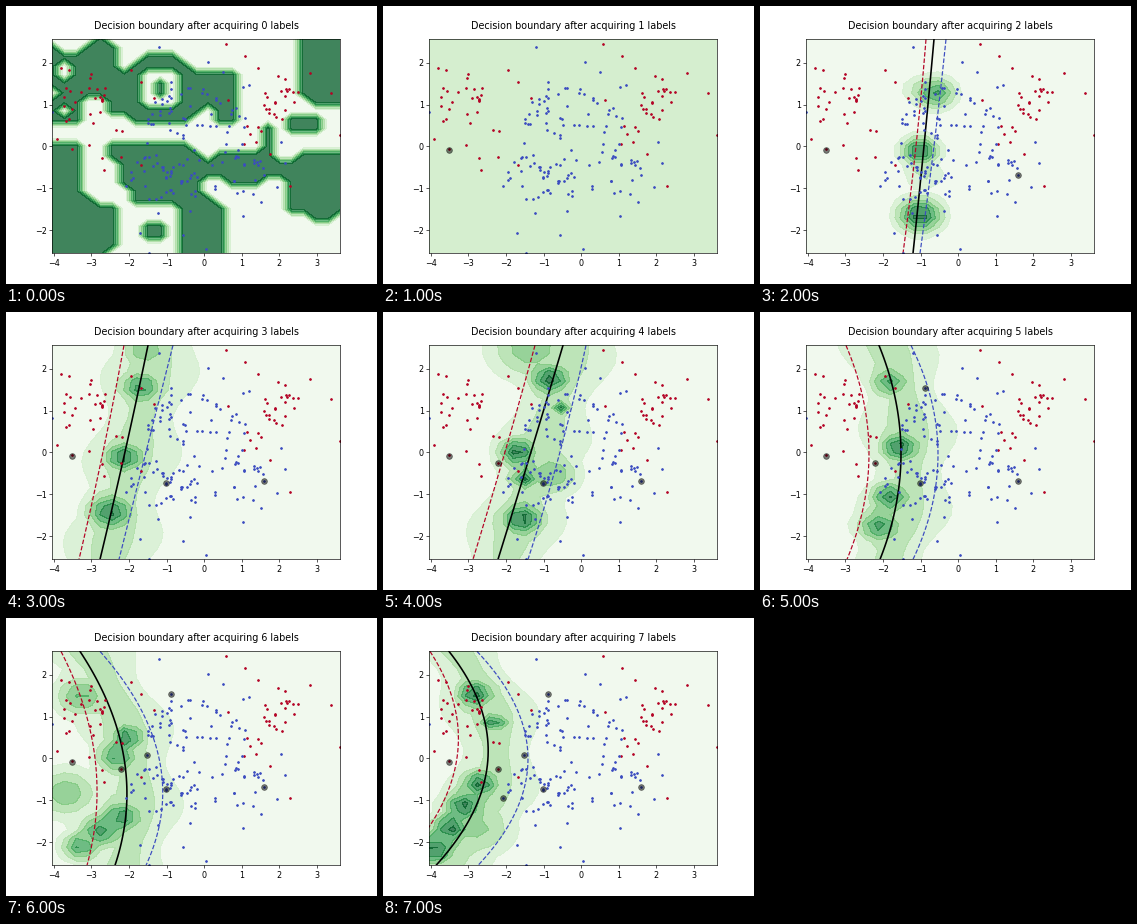
A matplotlib script that plays this animation: 371x278 px, repeating every 8 s.

```python
import numpy as np
import matplotlib.pyplot as plt
from matplotlib.animation import FuncAnimation

W, H, DPI = 371, 278, 58
RED, BLUE = "#b40426", "#3b4cc0"
LEFT, RIGHT, TOP, BOTTOM = 46.4, 333.9, 33.4, 247.4
LEVELS = np.linspace(0, 1.05, 8)

fig, ax = plt.subplots(figsize=(W / DPI, H / DPI), dpi=DPI)
rng = np.random.default_rng(4)


def to_data(x, y):
    """Stage pixels to axes units."""
    return (np.asarray(x) - 198.2) / 37.6, (140.5 - np.asarray(y)) / 41.75


def cloud(n, x, y, sx, sy):
    """Evenly loose cluster inside an ellipse."""
    angle = rng.uniform(0, 2 * np.pi, n)
    radius = np.sqrt(rng.uniform(0, 1, n))
    return np.column_stack([x + sx * radius * np.cos(angle), y + sy * radius * np.sin(angle)])


# Outlying samples are placed, the dense middles are drawn at random.
reds = np.vstack([
    [(55, 62), (63, 64), (85, 68), (125, 64), (135, 76), (148, 92), (110, 124), (116, 125),
     (51, 133), (83, 139), (66, 143), (96, 152), (98, 164), (115, 151), (135, 159),
     (220, 38), (239, 50), (252, 62), (222, 94), (304, 67), (325, 87), (334, 129),
     (238, 138), (264, 148), (284, 180)],
    cloud(22, 78, 97, 26, 27), cloud(22, 273, 91, 20, 24), cloud(5, 249, 118, 10, 22)])
blues = np.vstack([
    [(153, 41), (202, 56), (165, 76), (165, 83), (46, 106), (217, 66), (237, 81), (243, 79),
     (141, 137), (120, 180), (160, 171), (275, 136), (279, 157), (258, 169), (271, 181),
     (255, 196), (237, 210), (200, 243), (177, 229), (143, 247), (134, 227), (152, 207),
     (184, 205)],
    cloud(32, 184, 107, 34, 26), cloud(7, 149, 107, 10, 14), cloud(32, 151, 172, 28, 24),
    cloud(12, 185, 167, 10, 31), cloud(23, 231, 169, 28, 26), cloud(10, 228, 121, 14, 25)])
queries = np.array([(66.5, 144.5), (258, 169), (160, 171), (115, 151),
                    (165, 76), (141, 137), (120, 180)])

gx, gy = np.meshgrid(np.linspace(LEFT, RIGHT, 25), np.linspace(TOP, BOTTOM, 25))

# Untrained model, rounded boxes: centre x, y and half sizes.
solid = [(75, 60, 36, 32), (56, 108, 22, 14), (155, 86, 40, 36), (115, 90, 16, 18),
         (58, 160, 20, 28), (62, 224, 50, 32), (108, 145, 14, 9), (155, 166, 40, 31),
         (150, 222, 16, 10), (322, 58, 36, 40), (297, 118, 17, 9), (216, 92, 22, 26),
         (262, 130, 7, 12), (318, 178, 40, 34), (238, 162, 40, 15), (195, 222, 25, 32)]
holes = [(70, 36, 13, 11), (58, 65, 7, 8), (58, 104, 7, 6), (154, 82, 19, 18),
         (203, 108, 7, 12)]
core = [(154, 82, 6, 7)]

# Uncertainty bumps per label count: x, y, width, height of peak.
bumps = {
    2: [(160, 145, 18, 1), (160, 209, 22, 1.02), (175, 87, 20, .82), (160, 84, 18, .4),
        (164, 168, 20, .36)],
    3: [(118, 145, 20, .98), (105, 200, 24, .95), (135, 75, 22, .85), (140, 38, 26, .6)],
    4: [(167, 67, 20, 1.02), (177, 96, 11, .92), (135, 140, 19, 1.02), (142, 166, 15, .98),
        (168, 162, 28, .62), (139, 207, 22, 1), (148, 36, 42, .56)],
    5: [(140, 135, 20, 1), (130, 185, 20, .92), (120, 214, 22, .85), (130, 70, 20, .8)],
    6: [(121, 119, 17, .95), (112, 138, 22, .82), (115, 199, 22, .88), (95, 213, 22, .86),
        (75, 228, 19, .82), (76, 78, 27, .64), (60, 175, 32, .57)],
    7: [(92, 76, 19, 1), (111, 104, 13, 1), (97, 166, 19, .98), (81, 188, 20, 1),
        (68, 210, 20, 1), (52, 231, 22, .98), (94, 210, 38, .5)],
}

# Boundary x at the top, middle and bottom: red, black, blue.
boundaries = {
    2: [(166, 156, 143), (174, 164, 153), (186, 174, 160)],
    3: [(118, 97, 73), (142, 119, 94), (167, 140, 113)],
    4: [(152, 122, 90), (180, 148, 115), (203, 177, 145)],
    5: [(86, 109, 87), (119, 141, 120), (151, 178, 153)],
    6: [(55, 89, 81), (74, 118, 109), (94, 153, 140)],
    7: [(47, 74, 15), (66, 105, 53), (94, 145, 95)],
}


def curve(xs, y):
    return np.polyval(np.polyfit((TOP, 140, BOTTOM), xs, 2), y)


def inside(boxes):
    mask = np.zeros(gx.shape, bool)
    for x, y, rx, ry in boxes:
        mask |= abs((gx - x) / rx) ** 3 + abs((gy - y) / ry) ** 3 < 1
    return mask


def region_field():
    return (inside(solid) & ~inside(holes) | inside(core)).astype(float)


def bump_field(n):
    z = np.full(gx.shape, .02)
    if n > 2:
        # faint uneven halo along the boundary
        reach = 42 + 9 * np.sin(gy / 13 + n)
        z += .33 * np.exp(-((gx - curve(boundaries[n][1], gy) - 8) / reach) ** 2)
    for x, y, r, peak in bumps[n]:
        z = np.maximum(z, peak * np.exp(-((gx - x) / r) ** 2 - ((gy - y) / (.78 * r)) ** 2))
    return z


def draw_field(n):
    if n == 1:
        ax.set_facecolor("#d5eecf")
        return
    z = bump_field(n) if n else region_field()
    ax.contourf(*to_data(gx, gy), z, levels=LEVELS, cmap="Greens", alpha=.75)


def draw_boundaries(n):
    y = np.linspace(TOP, BOTTOM, 50)
    styles = [(RED, "--", 1.5), ("k", "-", 2), (BLUE, "--", 1.5)]
    for xs, (color, dash, width) in zip(boundaries.get(n, []), styles):
        ax.plot(*to_data(curve(xs, y), y), color=color, ls=dash, lw=width, zorder=1.5)


def draw(n):
    ax.clear()
    ax.set_facecolor("w")
    draw_field(n)
    draw_boundaries(n)
    for points, color in ((reds, RED), (blues, BLUE)):
        ax.scatter(*to_data(*points.T), s=5, color=color, zorder=2)
    ax.scatter(*to_data(*queries[:n].T), s=50, color="k", alpha=.5, zorder=2.1)
    xlim, ylim = to_data((LEFT, RIGHT), (BOTTOM, TOP))
    ax.set(xlim=xlim, ylim=ylim, xticks=range(-4, 4), yticks=range(-2, 3))
    ax.set_title(f"Decision boundary after acquiring {n} labels", pad=12.5)
    return []


anim = FuncAnimation(fig, draw, frames=8, init_func=lambda: [], interval=1000,
                     repeat=True, repeat_delay=0)
plt.show()
```
